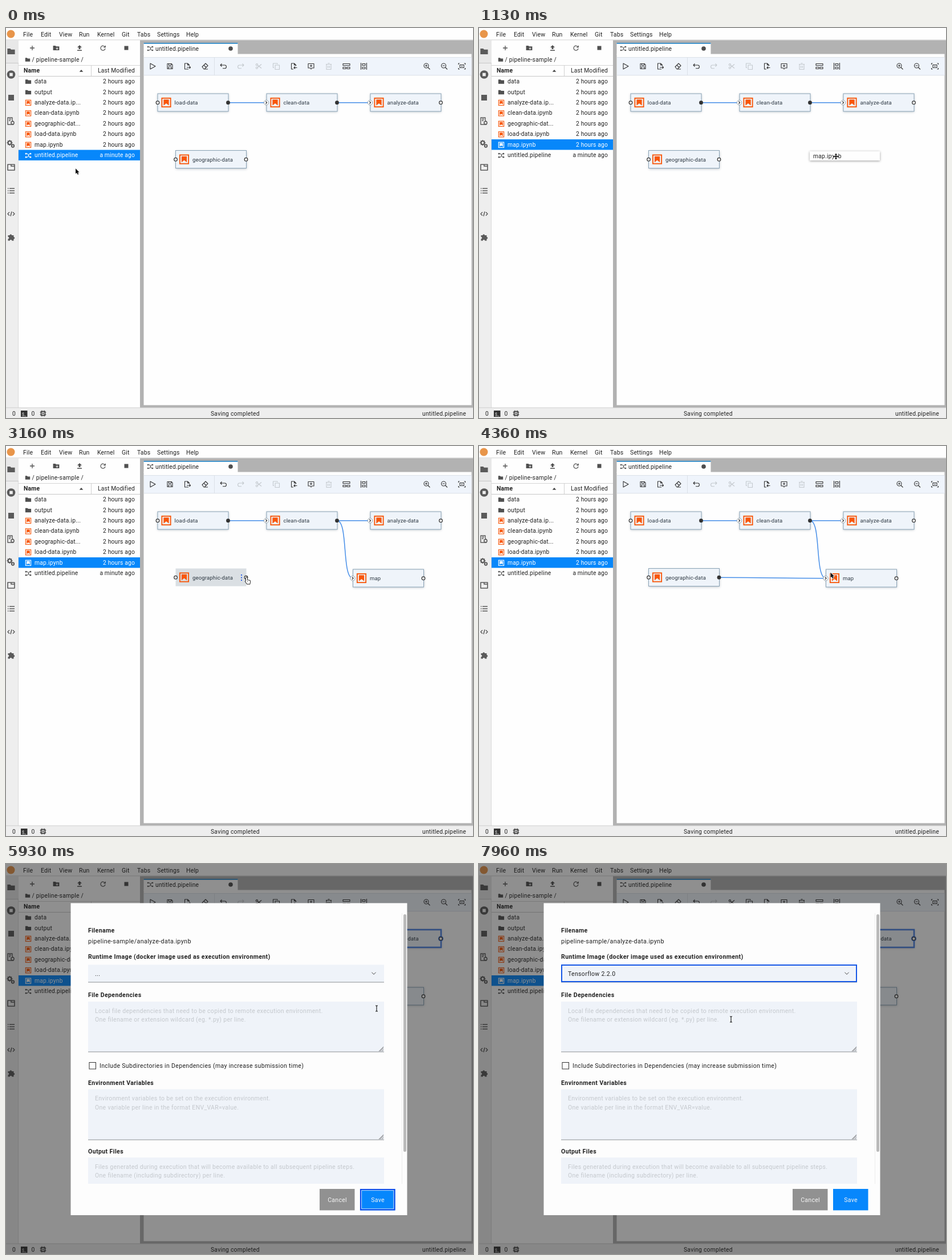
An HTML page with a canvas that plays this animation: 819 by 683 pixels, repeating every 8 s.

```html
<!DOCTYPE html>
<html lang="en">
<head>
<meta charset="utf-8">
<title>Pipeline editor</title>
<style>
html, body { margin: 0; width: 100%; height: 100%; overflow: hidden; background: #fefefe; }
canvas { display: block; width: 819px; height: 683px; }
</style>
</head>
<body>
<canvas id="stage"></canvas>
<script>
const W = 819, H = 683, LOOP = 8000;
const FONT = 'Roboto, "Open Sans", sans-serif';
const ORANGE = '#f8570a', LINK = '#468ee8', INK = '#333';
const canvas = document.getElementById('stage');
const ctx = canvas.getContext('2d');
const dpr = window.devicePixelRatio || 1;
canvas.width = W * dpr;
canvas.height = H * dpr;

// Event times in ms
const T = { pick: 600, lift: 680, drop: 1450, wire1: 2050, join1: 2480,
  wire2: 3400, join2: 4050, menu: 5050, dialog: 5860, focus: 6450, choose: 7600 };

// Pointer: time, x, y, shape
const POINTER = [
  [0, 122, 246, 'arrow'], [220, 122, 246, 'arrow'], [540, 76, 204, 'arrow'],
  [680, 76, 204, 'move'], [1130, 626, 225, 'move'], [1400, 612, 218, 'move'],
  [1450, 612, 218, 'arrow'], [1580, 612, 218, 'arrow'], [1950, 582, 128, 'arrow'],
  [2080, 582, 128, 'arrow'], [2420, 607, 231, 'arrow'], [2620, 607, 231, 'arrow'],
  [3060, 424, 236, 'hand'], [3400, 424, 236, 'arrow'], [3980, 607, 231, 'arrow'],
  [4250, 607, 231, 'arrow'], [4800, 697, 141, 'hand'], [5050, 697, 145, 'hand'],
  [5430, 697, 145, 'hand'], [5730, 650, 257, 'hand'], [5860, 650, 253, 'ibeam'],
  [5960, 650, 253, 'ibeam'], [6380, 600, 192, 'hand'], [6700, 600, 192, 'hand'],
  [7350, 442, 272, 'hand'], [7600, 442, 272, 'ibeam'], [8000, 442, 272, 'ibeam']
];

const NODES = {
  load: { x: 266, y: 115, label: 'load-data' },
  clean: { x: 457, y: 115, label: 'clean-data' },
  analyze: { x: 639, y: 115, label: 'analyze-data' },
  geo: { x: 297.5, y: 214.5, label: 'geographic-data' },
  map: { x: 608.5, y: 216, label: 'map' }
};
const NODE_W = 124, NODE_H = 31;
const HOVERS = [['map', T.join1, 2680], ['geo', 2980, T.wire2],
  ['map', T.join2, 4350], ['analyze', 4660, T.menu]];

const FILES = [
  ['data', 'folder'], ['output', 'folder'], ['analyze-data.ip...', 'book'],
  ['clean-data.ipynb', 'book'], ['geographic-dat...', 'book'],
  ['load-data.ipynb', 'book'], ['map.ipynb', 'book'], ['untitled.pipeline', 'flow']
];

const ICON = {
  folder: 'M-6-4.5H-1.5L0-3H6V4.5H-6Z',
  play: 'M-4-5L5 0L-4 5Z',
  save: 'M-4.5-4.5H2.5L4.5-2.5V4.5H-4.5ZM-2-4.5V-1.5H2V-4.5M-2.5 4.5V1H2.5V4.5',
  export: 'M2 5H-4.5V-5H.5L3.5-2V-1M.5-5V-2H3.5M-1 2H5.5M3.5 0L5.5 2L3.5 4',
  erase: 'M-5 1L1-5L5-1L-1 5H-2ZM-2-2L2 2M-1 5H5',
  undo: 'M-2.5-4.5L-5-2L-2.5.5M-5-2H2.5A2.8 2.8 0 0 1 2.5 3.8H-1',
  redo: 'M2.5-4.5L5-2L2.5.5M5-2H-2.5A2.8 2.8 0 0 0-2.5 3.8H1',
  cut: 'M-2-2L5 3.5M-2 2L5-3.5M-4.7-2.8a1.6 1.6 0 1 0 3.2 0a1.6 1.6 0 1 0-3.2 0M-4.7 2.8a1.6 1.6 0 1 0 3.2 0a1.6 1.6 0 1 0-3.2 0',
  copy: 'M-2-2H5.5V5.5H-2ZM-4 2.5H-5.5V-5H2V-3.5',
  paste: 'M-1 5H-4.5V-5H.5L3.5-2V-.5M.5-5V-2H3.5M5.5 2.5H0M2 .5L0 2.5L2 4.5',
  note: 'M-5-4.5H5V3H1.5L0 5L-1.5 3H-5ZM0-3V1.5M-2.2-.8H2.2',
  trash: 'M-5-3.5H5M-4-3.5V5.5H4V-3.5M-1.5-5.3H1.5M-1.3-1V3M1.3-1V3',
  rows: 'M-6-4.5H6V-1.5H-6ZM-6 1.5H-1V4.5H-6ZM1 1.5H6V4.5H1Z',
  cols: 'M-5-6V6M5-6V6M-2.5-4.5H2.5V-1.5H-2.5ZM-2.5 1.5H2.5V4.5H-2.5Z',
  lens: 'M-5-1a4 4 0 1 0 8 0a4 4 0 1 0-8 0M2 2L5.5 5.5M-3-1H1',
  fit: 'M-6-3V-5H-4M4-5H6V-3M6 3V5H4M-4 5H-6V3M-3.5-2.5H3.5V2.5H-3.5ZM-1.5 0H1.5',
  plus: 'M-4 0H4M0-4V4',
  upload: 'M0-5L4-1H1.5V2H-1.5V-1H-4ZM-4 3.4H4V5H-4Z',
  refresh: 'M3.6-1.6A4 4 0 1 0 4 .8M4.3-4.3V-1.3H1.2',
  tabs: 'M-6-5H6V5H-6ZM0-5V-2H6',
  list: 'M-6-4H-4.5M-6 0H-4.5M-6 4H-4.5M-3-4H6M-3 0H6M-3 4H6',
  code: 'M-3-3L-6 0L-3 3M3-3L6 0L3 3M1-4L-1 4',
  puzzle: 'M-6-3H-3A1.8 1.8 0 1 1 .6-3H4V0A1.8 1.8 0 1 1 4 3.6V6.5H.8A1.8 1.8 0 1 0-2.8 6.5H-6V3.4A1.8 1.8 0 1 0-6-.2Z',
  search: 'M-5-6H3V-1L5 1V6H-5ZM-3-3.5H1M-3-.8H0',
  flow: 'M-4-3H-1L2 3H4M-4 3H-1L2-3H4',
  chevron: 'M-2-4L2 0L-2 4',
  arrow: 'M0 0V9.3L2.2 7.4L3.7 10.8L5.4 10L3.9 6.8H6.6Z',
  move: 'M0-5.5L2-3H.8V-.8H3V-2L5.5 0L3 2V.8H.8V3H2L0 5.5L-2 3H-.8V.8H-3V2L-5.5 0L-3-2V-.8H-.8V-3H-2Z',
  hand: 'M-3-5A1 1 0 0 1-1-5V-1.2L3.4-.3Q4.5 0 4.2 1.5L3.5 5.5H-1.2L-4.2 1.3Q-4.5 0-3 .6Z',
  ibeam: 'M-2-5H-.8L0-4L.8-5H2M0-4V4M-2 5H-.8L0 4L.8 5H2'
};
const paths = Object.fromEntries(Object.entries(ICON).map(([k, d]) => [k, new Path2D(d)]));

function rect(x, y, w, h, fill) {
  ctx.fillStyle = fill;
  ctx.fillRect(x, y, w, h);
}

function text(s, x, mid, o = {}) {
  const { size = 10.3, gap = 0.16, color = '#222', weight = 400, align = 'left' } = o;
  ctx.font = `${weight} ${size}px ${FONT}`;
  ctx.letterSpacing = gap + 'px';
  ctx.textAlign = align;
  ctx.fillStyle = color;
  ctx.fillText(s, x, mid + 3.6);
}

function line(x1, y1, x2, y2, color, w = 1) {
  ctx.strokeStyle = color;
  ctx.lineWidth = w;
  ctx.beginPath();
  ctx.moveTo(x1, y1);
  ctx.lineTo(x2, y2);
  ctx.stroke();
}

function dot(x, y, r, fill, stroke, w = 1.2) {
  ctx.beginPath();
  ctx.arc(x, y, r, 0, 7);
  if (fill) { ctx.fillStyle = fill; ctx.fill(); }
  if (stroke) { ctx.strokeStyle = stroke; ctx.lineWidth = w; ctx.stroke(); }
}

function icon(name, x, y, { fill, stroke, w = 1.1, scale = 1 } = {}) {
  ctx.save();
  ctx.translate(x, y);
  ctx.scale(scale, scale);
  ctx.lineWidth = w;
  ctx.lineJoin = 'round';
  if (stroke) { ctx.strokeStyle = stroke; ctx.stroke(paths[name]); }
  if (fill) { ctx.fillStyle = fill; ctx.fill(paths[name]); }
  ctx.restore();
}

function book(x, y, size, color) {
  const k = size / 16;
  ctx.save();
  ctx.translate(x, y);
  ctx.scale(k, k);
  ctx.strokeStyle = ctx.fillStyle = color;
  ctx.lineWidth = 1.8;
  ctx.strokeRect(-7.4, -7.4, 14.8, 14.8);
  ctx.beginPath();
  [[-4.5, -5], [4.5, -5], [4.5, 5], [0, 1.5], [-4.5, 5]].forEach(p => ctx.lineTo(...p));
  ctx.fill();
  ctx.restore();
}

function flow(x, y, color) {
  icon('flow', x, y, { stroke: color, w: 1 });
  for (const sx of [-4, 4]) for (const sy of [-3, 3]) dot(x + sx, y + sy, 1.3, color);
}

function drawMenuBar() {
  rect(0, 0, W, 21, '#fefefe');
  rect(0, 20.5, W, 1, '#c6c6c6');
  dot(8.5, 10.5, 7, '#e8954a');
  [['File', 30], ['Edit', 61], ['View', 93], ['Run', 128], ['Kernel', 160],
    ['Git', 203], ['Tabs', 230], ['Settings', 265], ['Help', 316]]
    .forEach(([s, x]) => text(s, x, 11, { size: 10.5 }));
}

function drawSidebar() {
  const c = '#5a5a5a';
  rect(0, 21, 22, 644, '#eee');
  rect(21.5, 21, 1, 644, '#c8c8c8');
  rect(0, 21, 22, 40, '#e8e8e8');
  rect(0, 61, 22, 1, '#c8c8c8');
  icon('folder', 9, 41, { fill: c, scale: 1.1 });
  dot(9, 81.5, 7.3, c);
  rect(6.2, 78.7, 5.6, 5.6, '#eee');
  rect(4, 117, 10, 10, c);
  icon('search', 8, 163, { stroke: c, w: 1.4 });
  dot(11.5, 166, 2.6, '#eee', c, 1.5);
  dot(6.5, 201, 3, null, c, 2.2);
  dot(12, 206.5, 2.2, null, c, 1.9);
  for (let i = 0; i < 8; i++) {
    const a = i * Math.PI / 4, cx = Math.cos(a), cy = Math.sin(a);
    line(6.5 + cx * 3.5, 201 + cy * 3.5, 6.5 + cx * 5, 201 + cy * 5, c, 1.4);
  }
  icon('tabs', 9, 244, { stroke: c, w: 1.6 });
  icon('list', 9, 285, { stroke: c, w: 1.5 });
  icon('code', 9, 325.5, { stroke: c, w: 1.5 });
  icon('puzzle', 9.5, 366, { fill: c });
}

function drawBrowser(t) {
  const c = '#505050';
  rect(22, 21.5, 213, 643, '#fefefe');
  icon('plus', 46, 35, { stroke: c, w: 1.3 });
  icon('folder', 88, 35, { fill: c, scale: 0.9 });
  icon('plus', 89.5, 36, { stroke: '#fff', w: 1.8, scale: 0.5 });
  icon('upload', 129, 35, { fill: c });
  icon('refresh', 170, 35, { stroke: c, w: 1.2 });
  rect(207.5, 31.5, 7, 7, c);
  icon('folder', 38, 55.5, { fill: c, scale: 0.7 });
  text('/ pipeline-sample /', 45.5, 55.5, { gap: 0.25 });
  rect(22, 65, 213, 1, '#d5d5d5');
  rect(22, 84, 213, 1, '#c8c8c8');
  rect(149, 65, 1, 19, '#d0d0d0');
  text('Name', 31, 74.5, { weight: 700, size: 10.4 });
  ctx.fillStyle = '#444';
  ctx.beginPath();
  [[128.7, 76.8], [132, 73], [135.3, 76.8]].forEach(p => ctx.lineTo(...p));
  ctx.fill();
  text('Last Modified', 226, 74.5, { align: 'right' });
  const chosen = t < T.pick ? 7 : 6;
  FILES.forEach(([name, kind], i) => {
    const y = 93.5 + i * 18.45, on = i === chosen;
    if (on) rect(22, y - 9.2, 213, 18.4, '#0787fa');
    const color = on ? '#fff' : kind === 'book' ? ORANGE : c;
    if (kind === 'folder') icon('folder', 39, y + 0.5, { fill: color, scale: 0.85 });
    else if (kind === 'book') book(39, y + 0.5, 10, color);
    else flow(39, y + 0.5, color);
    const ink = { color: on ? '#fff' : '#222' };
    text(name, 50, y, { ...ink, gap: 0.22 });
    text(i === 7 ? 'a minute ago' : '2 hours ago', 226, y, { ...ink, align: 'right' });
  });
}

function drawFrame(t) {
  rect(235, 21.5, W - 235, 644, '#b2b2b2');
  rect(241.5, 45.5, 575, 615, '#fefefe');
  rect(241.5, 26, 165, 21, '#fefefe');
  rect(241.5, 26, 165, 1.6, '#1a7fc4');
  flow(253, 36, '#555');
  text('untitled.pipeline', 262, 36, { gap: 0.2 });
  dot(394, 36, 3.8, '#4d4d4d');
  rect(242, 51, 574.5, 32, '#eff4fb');
  rect(242, 51, 574.5, 0.8, '#d6dce4');
  rect(242, 82.5, 574.5, 0.8, '#d3dae2');
  rect(365, 51, 1, 32, '#dbe1e8');
  const off = '#c4c9ce', edit = t >= T.menu ? INK : off;
  [['play', 257], ['save', 287.5], ['export', 318], ['erase', 349], ['undo', 381],
    ['redo', 412, off], ['cut', 443, edit], ['copy', 474, edit], ['paste', 505],
    ['note', 535], ['trash', 566, edit], ['rows', 597], ['cols', 627.5],
    ['lens', 738], ['lens', 768.5], ['fit', 799.5]]
    .forEach(([name, x, color = INK]) => icon(name, x, 67, { stroke: color }));
  line(737, 64, 737, 68, INK, 1.1);
}

function drawStatus() {
  rect(0, 665, W, 18, '#eee');
  rect(0, 664.5, W, 1, '#cfcfcf');
  text('0', 11, 675);
  rect(26, 670, 11.5, 11, '#333');
  text('$_', 28, 675, { size: 7, gap: 0, color: '#fff' });
  text('0', 44.5, 675);
  ctx.strokeStyle = '#444';
  ctx.lineWidth = 1.5;
  ctx.strokeRect(61.5, 671.5, 7, 7);
  for (const d of [-2, 2]) {
    line(65 + d, 669.5, 65 + d, 680.5, '#444');
    line(59.5, 675 + d, 70.5, 675 + d, '#444');
  }
  rect(63, 673, 4, 4, '#eee');
  dot(65, 675, 1.3, '#444');
  text('Saving completed', 359, 675, { gap: 0.25 });
  text('untitled.pipeline', 807, 675, { align: 'right', gap: 0.25 });
}

function wire(x1, y1, x2, y2) {
  const bend = Math.max(20, (x2 - x1) / 2);
  ctx.strokeStyle = LINK;
  ctx.lineWidth = 1.5;
  ctx.beginPath();
  ctx.moveTo(x1, y1);
  ctx.bezierCurveTo(x1 + bend, y1, x2 - bend, y2, x2, y2);
  ctx.stroke();
}

const outPort = n => [n.x + NODE_W - 0.5, n.y + 15.7];
const inPort = n => [n.x, n.y + 15.7];
const connect = (a, b) => wire(...outPort(NODES[a]), ...inPort(NODES[b]));

function drawNode(id, { hover, selected, hasIn, hasOut, hot }) {
  const n = NODES[id];
  ctx.save();
  if (!hover) { ctx.shadowColor = 'rgba(60,80,100,.35)'; ctx.shadowBlur = 4 * dpr; ctx.shadowOffsetY = dpr; }
  rect(n.x, n.y, NODE_W, NODE_H, hover ? '#dadfe3' : '#eff4fa');
  ctx.restore();
  if (!hover) {
    ctx.strokeStyle = selected ? '#4a80e2' : '#8aa3b6';
    ctx.lineWidth = selected ? 2.6 : 1;
    ctx.strokeRect(n.x, n.y, NODE_W, NODE_H);
  }
  book(n.x + 15, n.y + 15.5, 16.5, ORANGE);
  text(n.label, n.x + 29.5, n.y + 15.8, { size: 9.5, gap: 0.16, color: '#2b3640' });
  if (hover) for (const d of [-4.5, 0, 4.5]) rect(n.x + 114.5, n.y + 15 + d, 2, 2, '#2f62e8');
  const [ix, iy] = inPort(n), [ox, oy] = outPort(n);
  if (hasIn) {
    dot(ix - 0.5, iy, 4.2, '#fefefe', '#8d99a3', 0.9);
    icon('chevron', ix - 0.5, iy, { stroke: '#222', scale: 0.55, w: 2.1 });
  } else dot(ix, iy, 2.8, '#fefefe', '#333', 1.2);
  if (selected) dot(ox, oy, 4.6, '#4a80e2');
  if (hot) dot(ox, oy, 2.9, '#fefefe', '#2f78e4', 1.3);
  else if (hasOut) dot(ox, oy, 3.4, '#333');
  else dot(ox, oy, 2.8, '#fefefe', '#333', 1.2);
}

function drawGraph(t, p) {
  connect('load', 'clean');
  connect('clean', 'analyze');
  if (t >= T.join1) connect('clean', 'map');
  if (t >= T.join2) connect('geo', 'map');
  const pull = t >= T.wire1 && t < T.join1 ? 'clean' : t >= T.wire2 && t < T.join2 ? 'geo' : null;
  if (pull) wire(...outPort(NODES[pull]), p.x, p.y);
  for (const id in NODES) {
    if (id === 'map' && t < T.drop) continue;
    drawNode(id, {
      hover: HOVERS.some(([h, a, b]) => h === id && t >= a && t < b),
      selected: id === 'analyze' && t >= T.menu,
      hasIn: id === 'clean' || id === 'analyze' || (id === 'map' && t >= T.join1),
      hasOut: id === 'load' || id === 'clean' || (id === 'geo' && t >= T.join2),
      hot: pull === id || (id === 'clean' && t >= 1930 && t < T.join1)
    });
  }
}

function shadowBox(x, y, w, h, fill) {
  ctx.save();
  ctx.shadowColor = 'rgba(0,0,0,.4)';
  ctx.shadowBlur = 4 * dpr;
  ctx.shadowOffsetY = dpr;
  rect(x, y, w, h, fill);
  ctx.restore();
}

function drawMenu(p) {
  shadowBox(579, 127.5, 123, 141, '#eff4fb');
  const items = [['Disconnect', 139.5], ['Edit', 163.5], ['Delete', 187],
    ['Highlight', 211], ['Open Notebook', 234], ['Properties', 257]];
  const at = items.findIndex(([, y]) => Math.abs(p.y - 1 - y) < 11.8);
  if (at >= 0) rect(579, items[at][1] - 12, 123, 23.5, '#dadde2');
  rect(579, 174.8, 123, 0.9, '#d6dce3');
  rect(579, 198, 123, 0.9, '#d6dce3');
  items.forEach(([s, y], i) => {
    text(s, 589, y, { size: 10.7, gap: 0.22, color: '#222b35' });
    if (i === 1 || i === 3) icon('chevron', 685.5, y, { stroke: INK });
  });
}

function field(y, h, hints, grip = true) {
  rect(144, y, 519, h, '#eff3f9');
  rect(144, y + h - 0.5, 519, 1, '#8b8f94');
  hints.forEach((s, i) => text(s, 156, y + 16 + i * 15.4, { size: 10.5, gap: 0.3, color: '#c4c8cd' }));
  if (grip) for (const d of [3, 6, 8]) line(662 - d, y + h - 1, 662, y + h - 1 - d, '#666', 0.9);
}

function button(x, label, fill) {
  rect(x, 569, 61.5, 37.5, fill);
  text(label, x + 31, 588, { size: 10.6, gap: 0.2, color: '#f4f4f4', align: 'center' });
}

function drawDialog(t) {
  const body = { size: 10.5, gap: 0.33 };
  const head = (s, y) => text(s, 144, y, { size: 10.6, gap: 0.37, weight: 700 });
  rect(0, 0, W, H, 'rgba(22,22,22,.48)');
  rect(113.5, 68.5, 590, 546.5, '#fdfdfd');
  rect(694, 86, 1, 474, '#ececec');
  ctx.fillStyle = '#bababa';
  ctx.beginPath();
  ctx.roundRect(697, 88, 5, 416, 2.5);
  ctx.fill();
  head('Filename', 116.5);
  text('pipeline-sample/analyze-data.ipynb', 144, 135.5, { ...body, size: 10.8 });
  head('Runtime Image (docker image used as execution environment)', 162);
  field(176.5, 30.5, [], false);
  const open = t >= T.focus;
  if (open) {
    ctx.strokeStyle = '#1557e6';
    ctx.lineWidth = 2;
    ctx.strokeRect(145, 177, 517, 29);
  }
  text(t >= T.choose ? 'Tensorflow 2.2.0' : '...', 156, 192, body);
  ctx.save();
  ctx.translate(645, 191.5);
  ctx.rotate(Math.PI / 2);
  icon('chevron', 0, 0, { stroke: INK, scale: 0.9, w: 1 });
  ctx.restore();
  head('File Dependencies', 229.5);
  field(241, 88, ['Local file dependencies that need to be copied to remote execution environment.',
    'One filename or extension wildcard (eg. *.py) per line.']);
  ctx.strokeStyle = '#333';
  ctx.lineWidth = 1;
  ctx.strokeRect(146, 347.5, 11.5, 11.5);
  text('Include Subdirectories in Dependencies (may increase submission time)', 164, 353, body);
  head('Environment Variables', 383.5);
  field(394.5, 88.5, ['Environment variables to be set on the execution environment.',
    'One variable per line in the format ENV_VAR=value.']);
  head('Output Files', 503);
  ctx.save();
  ctx.beginPath();
  ctx.rect(113, 500, 590, 60);
  ctx.clip();
  field(514, 88, ['Files generated during execution that will become available to all subsequent pipeline steps.',
    'One filename (including subdirectory) per line.'], false);
  ctx.restore();
  button(550, 'Cancel', '#919191');
  button(621, 'Save', '#0787fc');
  if (!open) {
    ctx.lineWidth = 2.2;
    ctx.strokeStyle = '#0c4bea';
    ctx.strokeRect(622, 570.1, 59.4, 35.3);
    ctx.lineWidth = 0.9;
    ctx.strokeStyle = '#d5e8fc';
    ctx.strokeRect(623.6, 571.7, 56.2, 32.1);
  }
}

function pointerAt(t) {
  let i = POINTER.length - 2;
  while (i > 0 && POINTER[i][0] > t) i--;
  const [t0, x0, y0, kind] = POINTER[i], [t1, x1, y1] = POINTER[i + 1];
  const u = (t - t0) / (t1 - t0), k = u * u * (3 - 2 * u);
  return { x: x0 + (x1 - x0) * k, y: y0 + (y1 - y0) * k, kind };
}

function drawPointer({ x, y, kind }) {
  if (kind === 'hand') {
    icon(kind, x, y, { stroke: '#222', fill: '#fefefe', w: 1.8 });
    line(x - 0.6, y, x - 0.6, y + 2, '#555', 0.7);
  } else if (kind === 'ibeam') {
    icon(kind, x, y, { stroke: '#111', w: 1.1 });
  } else icon(kind, x, y, { stroke: '#fff', fill: '#111', w: 1.6 });
}

function draw(t) {
  const p = pointerAt(t);
  ctx.setTransform(dpr, 0, 0, dpr, 0, 0);
  rect(0, 0, W, H, '#fefefe');
  drawMenuBar();
  drawSidebar();
  drawBrowser(t);
  drawFrame(t);
  drawGraph(t, p);
  drawStatus();
  if (t >= T.lift && t < T.drop) {
    shadowBox(p.x - 46, p.y - 9, 123, 16, '#fefefe');
    text('map.ipynb', p.x - 40, p.y - 1, { gap: 0.22 });
  }
  if (t >= T.menu && t < T.dialog) drawMenu(p);
  if (t >= T.dialog) drawDialog(t);
  drawPointer(p);
}

const start = performance.now();
function tick() {
  draw((performance.now() - start) % LOOP);
  requestAnimationFrame(tick);
}
tick();
</script>
</body>
</html>
```
